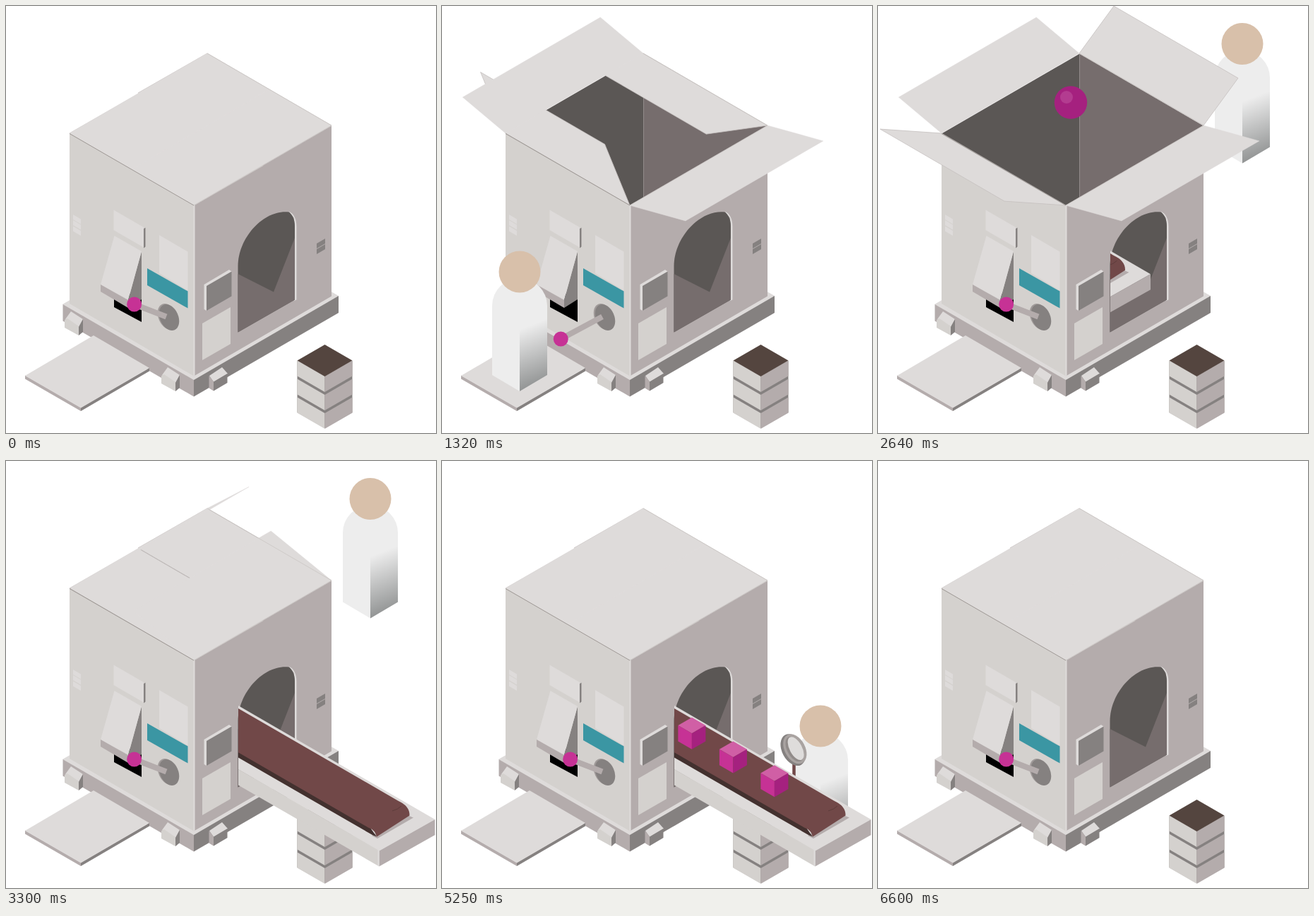
An HTML page for the animation above (6.93 s loop, 609x604 px).

```html
<!DOCTYPE html>
<html lang="en">
<head>
<meta charset="utf-8">
<title>Box machine</title>
<style>
  html, body { margin: 0; width: 100%; height: 100%; overflow: hidden; background: #fff; }
  svg { display: block; width: 609px; height: 604px; }
  .top { fill: #dedbda; }
  .lit { fill: #d4d1ce; }
  .mid { fill: #b4acac; }
  .dim { fill: #858180; }
  .in1 { fill: #5b5755; }
  .in2 { fill: #766d6d; }
  .seam { stroke: #c6c1bf; stroke-width: .8; }
</style>
</head>
<body>
<svg viewBox="0 0 609 604">
  <defs>
    <linearGradient id="shade" gradientUnits="userSpaceOnUse" x1="12" y1="-92" x2="42" y2="-16">
      <stop offset="0" stop-color="#ededed"/>
      <stop offset="1" stop-color="#929494"/>
    </linearGradient>
    <clipPath id="exit"><path d="M329 0H609V604H329Z"/></clipPath>
    <clipPath id="mouth"><path d="M90 0H461V169L266 282L90 180Z"/></clipPath>

    <!-- standing on the point 0,0 -->
    <g id="person">
      <path fill="#ededed" d="M-39-23V-121A39 39 0 0 1 39-121V-23L0 0Z"/>
      <path fill="url(#shade)" d="M0-87L39-113V-23L0 0Z"/>
      <circle cy="-169" r="29.5" fill="#d8c0aa"/>
    </g>
    <g id="foot">
      <path class="top" d="M92 432L109 443L103 454L84 443Z"/>
      <path class="lit" d="M83 444L87 442L103 453V466L83 455Z"/>
      <path class="dim" d="M103 454L109 443V461L103 466Z"/>
    </g>
    <g id="crate">
      <path class="lit" d="M412.500 501.500L451.500 524V546L412.500 523.500Z"/>
      <path class="mid" d="M451.500 524L490.500 501.500V523.500L451.500 546Z"/>
    </g>
    <path id="slot" class="top" d="M95 295L106 301.500V308.500L95 302Z"/>
    <path id="vent" class="dim" d="M440 336L452 329V336L440 343Z"/>
    <g id="cube">
      <path fill="#d05fa5" d="M0-22.500L19.500-11.250L0 0L-19.500-11.250Z"/>
      <path fill="#c63295" d="M-19.500-11.250L0 0V22.500L-19.500 11.250Z"/>
      <path fill="#a5217f" d="M0 0L19.500-11.250V11.250L0 22.500Z"/>
    </g>
  </defs>

  <use id="p2" href="#person"/>

  <!-- base -->
  <path class="top" d="M80 422L285 304L471 410L266 530Z"/>
  <path class="mid" d="M80.500 422L266 529V552.500L80.500 445.500Z"/>
  <path class="dim" d="M266 529L471 410V434L266 552.500Z"/>
  <use href="#foot"/>
  <use href="#foot" x="137" y="79"/>
  <path class="top" d="M288 523L306 511L314 520L294 532Z"/>
  <path class="mid" d="M287.500 523L294 531V544.500L287.500 540.500Z"/>
  <path class="dim" d="M294 531.500L313.500 520V533L294 544.500Z"/>

  <!-- ramp -->
  <path class="mid" d="M27 522.500L106 568V573L27 527.500Z"/>
  <path class="dim" d="M106 568L203 512V516.500L106 573Z"/>
  <path class="top" d="M124 466L203 512L106 568.500L27 523Z"/>

  <!-- inside and walls -->
  <path class="in1" d="M90 180.500L285.500 67.500V271L266 282Z"/>
  <path class="in2" d="M285.500 67.500L461 169.500L285.500 271Z"/>
  <g clip-path="url(#mouth)">
    <g id="ball">
      <circle r="23.200" fill="#a5217f"/>
      <circle cx="-6" cy="-7.500" r="9" fill="#b33c90"/>
    </g>
  </g>
  <path class="lit" d="M90 180.500L266 282V523.500L90 421Z"/>
  <path class="mid" d="M266 282L461 169.500V410.500L266 523.500Z"/>
  <path class="top" d="M265.500 282H267.500V523L265.500 523.500Z"/>

  <!-- left wall fittings -->
  <use href="#slot"/><use href="#slot" y="8"/><use href="#slot" y="16.500"/>
  <path class="top" d="M152.500 288.500L195 313V341.500L152.500 317Z"/>
  <path class="dim" d="M195 315L197.500 313.500V340.500L195 342.500Z"/>
  <path d="M153 400L192 412V447L153 426Z"/>
  <path class="dim" d="M192 347V415L173 427V416Z"/>
  <path class="mid" d="M134 393L173 415.500V427L134 404Z"/>
  <path class="top" d="M153.500 325L192 347L173 416L134 394Z"/>
  <path class="top" d="M217 324L257.500 347.500V402.500L217 378Z"/>
  <path fill="#3b96a3" d="M200 371L257.500 403.500V427.500L200 395Z"/>
  <ellipse rx="13" ry="19.300" transform="translate(229 439.500) rotate(-24)" fill="#a09a99"/>
  <ellipse rx="13" ry="19.300" transform="translate(231 440.500) rotate(-24)" class="dim"/>
  <line id="arm" x1="227" y1="439.500" stroke="#b4acac" stroke-width="8"/>
  <circle id="knob" r="10.500" fill="#c63295"/>

  <!-- right wall fittings -->
  <path class="top" d="M280.500 394L316 373L319.500 375.500L284 431L280.500 429Z"/>
  <path class="dim" d="M284 396L319.500 375.500V410.500L284 431Z"/>
  <path class="lit" d="M278 449L318 426V478L278 501Z"/>
  <use href="#vent"/><use href="#vent" y="8"/>
  <path class="top" d="M400 290.500C408 293 411.500 302 411.500 312V415.500L408 417V300Z"/>
  <path class="in1" d="M328.500 461.500V368C328.500 327 366 287 401 291.500C406 296 409 302 409 311V415.500Z"/>
  <path class="in2" d="M328.500 379L379 404.500L409 328V415.500L328.500 461.500Z"/>

  <!-- flaps, lowest first -->
  <path id="br" class="top seam"/>
  <path id="fl" class="top seam"/>
  <path id="lb" class="top" stroke="#dedbda" stroke-width=".5"/>
  <path id="fr" class="top" stroke="#dedbda" stroke-width=".5"/>
  <path d="M90 180.500L266 282" stroke="#99938f" stroke-width=".9"/>
  <path d="M285 67L461 169L266 282" fill="none" stroke="#c8c3c1" stroke-width=".7"/>

  <!-- crates -->
  <path class="dim" d="M412.500 502L451.500 524L490.500 502V575L451.500 597L412.500 575Z"/>
  <use href="#crate"/><use href="#crate" y="26"/><use href="#crate" y="52"/>
  <path fill="#54453f" d="M451.500 479L490.500 501.500L451.500 524L412.500 501.500Z"/>

  <g id="p3">
    <use href="#person"/>
    <g id="lens">
      <path stroke="#714848" stroke-width="4.500" d="M-49-124V-80"/>
      <g transform="translate(-49 -144) rotate(-28)">
        <ellipse cx="-1.500" rx="15.500" ry="24" class="dim"/>
        <ellipse cx="1.500" rx="14.500" ry="22.500" fill="#a9a3a1"/>
        <ellipse cx="1" rx="10.500" ry="19" fill="#918b89"/>
        <ellipse cx="3" rx="8.800" ry="18" fill="#dedcdb"/>
      </g>
    </g>
  </g>

  <!-- conveyor -->
  <g clip-path="url(#exit)">
    <g id="belt">
      <path class="top" d="M129 230.500L607.500 507L528.500 551.500L129 320.500Z"/>
      <path class="lit" d="M129 320.500L528.500 551V573.500L129 343Z"/>
      <path class="mid" d="M528.500 551.500L607.500 507V529L528.500 573.500Z"/>
      <path class="top" d="M526.500 550H528.500V573L526.500 572Z"/>
      <path class="mid" d="M566 500L577 504.500L526 534L518 530Z"/>
      <path fill="#43312f" d="M129 296L516 519L525 531.500L519 529L129 304Z"/>
      <path fill="#714848" d="M129 234.500L555 480.500Q572 488 571.500 501.500L525 531.500Q523 522 513 518.500L129 297Z"/>
      <path d="M547 495Q555 493 560 488" fill="none" stroke="#593938" stroke-width=".8"/>
    </g>
    <g id="cubes">
      <use href="#cube"/><use href="#cube"/><use href="#cube"/><use href="#cube"/>
    </g>
  </g>

  <use id="p1" href="#person"/>
</svg>
<script>
const LOOP = 6930, STEP = 30, SLOPE = 0.577;
const el = id => document.getElementById(id);
const prog = (t, start, len) => Math.min(1, Math.max(0, (t - start) / len));
const sine = u => (1 - Math.cos(Math.PI * u)) / 2;
const backOut = u => 1 + 3.6 * (u - 1) ** 3 + 2.6 * (u - 1) ** 2;
const place = (node, x, y, s = 1) =>
  node.setAttribute('transform', `translate(${x} ${y}) scale(${s})`);

// Pops in with overshoot, shrinks out.
const pop = (t, start, end) =>
  t < end ? backOut(prog(t, start, 400)) : 1 - prog(t, end, 200) ** 3;

// Hinge ends, inward reach, height, full angle, shortening per degree, opening and closing times.
const flaps = {
  fr: { a: [266, 282], b: [461, 169], in: [-88, -51], h: 102, max: 165.4, cut: 0.00045, open: 300, shut: 2968 },
  lb: { a: [90, 180], b: [285, 67], in: [88, 51], h: 102, max: 167.4, cut: 0.00175, open: 419, shut: 3036 },
  fl: { a: [90, 180], b: [266, 282], in: [98, -56], h: 113, max: 151, cut: -0.0001, open: 785, shut: 2895 },
  br: { a: [285, 67], b: [461, 169], in: [-98, 56], h: 113, max: 145.4, cut: 0.0027, open: 1120, shut: 2820 }
};

function drawFlap(id, t) {
  const f = flaps[id];
  const deg = f.max * (sine(prog(t, f.open, 816)) - sine(prog(t, f.shut, 400)));
  const r = deg * Math.PI / 180, len = 1 - f.cut * deg;
  const dx = len * f.in[0] * Math.cos(r);
  const dy = len * (f.in[1] * Math.cos(r) - f.h * Math.sin(r));
  const [ax, ay] = f.a, [bx, by] = f.b;
  el(id).setAttribute('d',
    `M${ax} ${ay}L${bx} ${by}L${bx + dx} ${by + dy}L${ax + dx} ${ay + dy}Z`);
}

function drawLever(t) {
  const u = sine(prog(t, 850, 350)) - sine(prog(t, 1430, 270));
  const a = (201 - 50 * u) * Math.PI / 180, len = 47.5 + 18.5 * u;
  const x = 226 + len * Math.cos(a), y = 439 + len * Math.sin(a);
  el('arm').setAttribute('x2', x);
  el('arm').setAttribute('y2', y);
  place(el('knob'), x, y);
}

function drawBelt(t) {
  const back = 335 * (1 - prog(t, 2555, 660)) ** 3 + 340 * prog(t, 6350, 250) ** 3;
  place(el('belt'), -back, -back * SLOPE);

  const lead = 495 - 88 * (Math.max(0, 5760 - t) / 1350) ** 1.33;
  const size = 1 - prog(t, 5820, 200) ** 3;
  [...el('cubes').children].forEach((cube, i) => {
    const x = lead - i * 58.5;
    place(cube, x, 416 + (x - 407) * SLOPE, size);
  });
}

function render(t) {
  Object.keys(flaps).forEach(id => drawFlap(id, t));
  drawLever(t);
  drawBelt(t);
  place(el('p1'), 110, 545, pop(t, 450, 1480));
  place(el('p2'), 516, 222.5, pop(t, 1760, 3360));
  place(el('p3'), 536, 544, pop(t, 3680, 5880));
  place(el('ball'), 273, 136.5 + 220 * prog(t, 2660, 220) ** 2, backOut(prog(t, 2240, 400)));
  const sway = (1 - Math.cos(Math.PI * (t - 4410) / 280)) / 2;
  place(el('lens'), 11.5 * sway, 8 * sway);
}

const begin = performance.now();
function tick() {
  const t = (performance.now() - begin) % LOOP;
  render(Math.floor(t / STEP) * STEP);
  requestAnimationFrame(tick);
}
tick();
</script>
</body>
</html>
```
